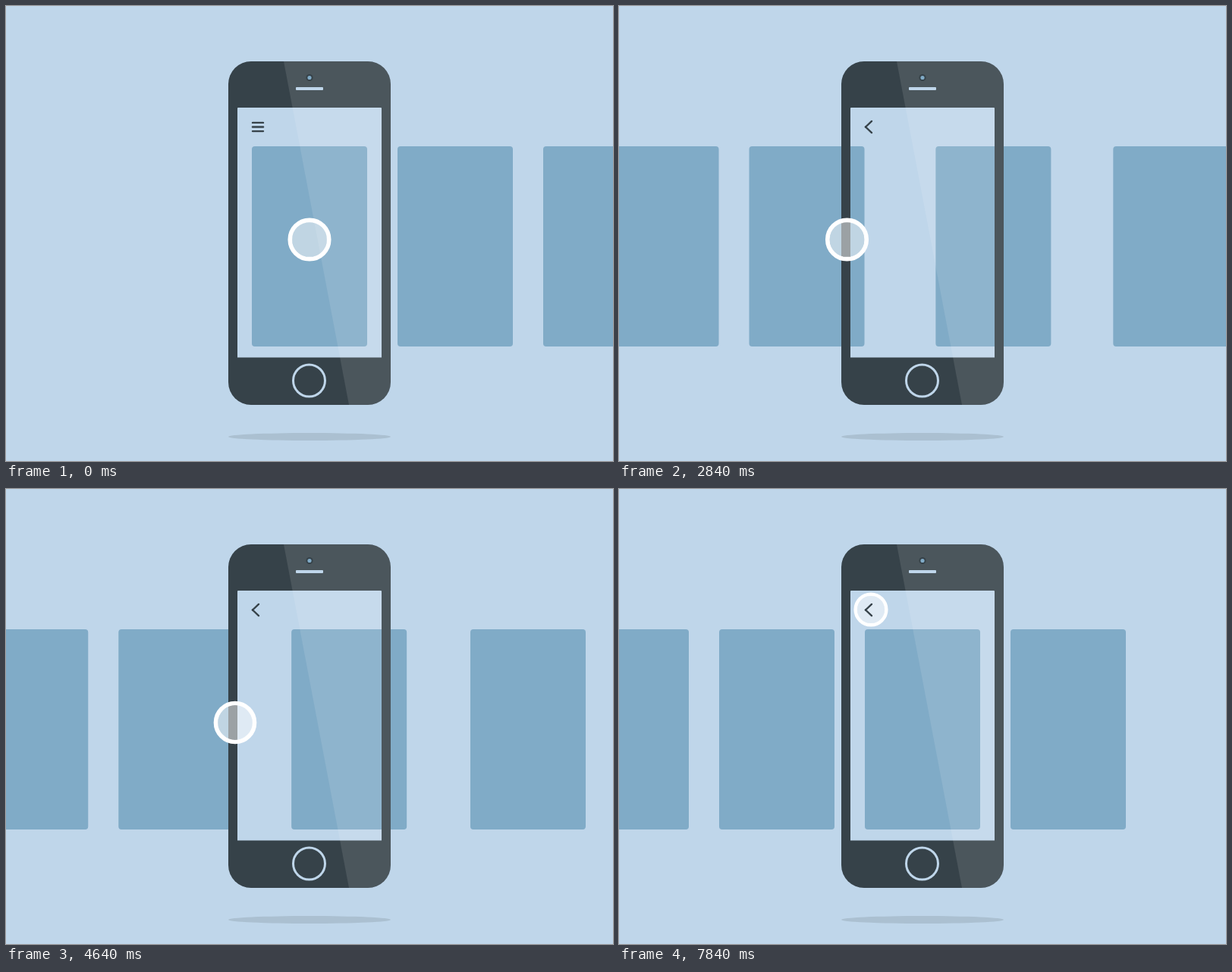
Animation of 800x600 px, one loop 8 s. Source, as an HTML page:

```html
<!DOCTYPE html>
<html lang="en">
<head>
<meta charset="utf-8">
<title>Card swipe</title>
<style>
  html, body { margin: 0; width: 100%; height: 100%; overflow: hidden; background: #bfd6ea; }
  svg { display: block; width: 100vw; height: 100vh; }
</style>
</head>
<body>
<svg viewBox="0 0 800 600">
  <defs>
    <clipPath id="body"><rect x="293" y="73" width="214" height="453" rx="30"/></clipPath>
  </defs>
  <rect width="800" height="600" fill="#bfd6ea"/>
  <ellipse cx="400" cy="568" rx="107" ry="5" fill="#abc0d1"/>
  <g id="cards" fill="#80abc7"></g>
  <g clip-path="url(#body)">
    <path fill="#364249" fill-rule="evenodd" d="M293 73H507V526H293Z M306 134H494Q495 134 495 135V463.5H305V135Q305 134 306 134Z"/>
    <path fill="#fff" fill-opacity=".105" d="M366 73H507V526H452Z"/>
  </g>
  <circle cx="400" cy="94.5" r="4.6" fill="#364249"/>
  <circle cx="400" cy="94.5" r="2.6" fill="#80abc7"/>
  <rect x="382" y="107" width="36" height="4" rx="1" fill="#bfd6ea"/>
  <circle cx="399.5" cy="494" r="21" fill="none" stroke="#bfd6ea" stroke-width="3"/>
  <g id="touch">
    <circle r="23" fill="#fff" fill-opacity=".5"/>
    <circle r="25.7" fill="none" stroke="#fff" stroke-width="5.7"/>
  </g>
  <g id="icon" stroke="#364249" stroke-width="2.4" stroke-linecap="round">
    <line/><line/><line/>
  </g>
</svg>
<script>
const LOOP = 8000, STEP = 40, PITCH = 192, COUNT = 6;

// middle of the snap, its length, lag of the first and further followers, end of the drag
const swipes = [
  { mid: 1329, len: 500, lag: 51, more: 22, end: 1386 },
  { mid: 2808, len: 500, lag: 31, more: 20, end: 2866 },
  { mid: 3698, len: 250, lag: 25, more: 14, end: 3777 },
  { mid: 4608, len: 250, lag: 21, more: 11, end: 4681 },
  { mid: 5371, len: 450, lag: 25, more: 18, end: 5440 }
];
const back = { mid: 6944, len: 400, lag: 25, more: 25 };

const clamp = p => Math.min(1, Math.max(0, p));
const power = n => p => p < .5 ? (2 * p) ** n / 2 : 1 - (2 - 2 * p) ** n / 2;
const cubic = power(3), quint = power(5);
const expo = p => p <= 0 ? 0 : p >= 1 ? 1
  : p < .5 ? 2 ** (20 * p - 10) / 2 : 1 - 2 ** (10 - 20 * p) / 2;
const tween = (t, from, to, ease = cubic) => ease(clamp((t - from) / (to - from)));
const mix = (a, b, p) => a + (b - a) * p;

function snap(t, s, rank) {
  const delay = rank > 0 ? s.lag + (rank - 1) * s.more : 0;
  const start = s.mid - s.len / 2 + delay;
  return tween(t, start, start + s.len, expo);
}

const $ = id => document.getElementById(id);
const set = (el, attrs) => { for (const k in attrs) el.setAttribute(k, attrs[k]); };

const cards = Array.from({ length: COUNT }, () => {
  const el = document.createElementNS("http://www.w3.org/2000/svg", "rect");
  set(el, { y: 185, width: 152, height: 264, rx: 4 });
  return $("cards").appendChild(el);
});
const bars = $("icon").children;

function drawCards(t) {
  cards.forEach((el, i) => {
    let slot = i + snap(t, back, COUNT - 1 - i);
    swipes.forEach((s, k) => slot -= snap(t, s, i - k));
    set(el, { x: (324 + slot * PITCH).toFixed(2) });
  });
}

function drawTouch(t) {
  let x = 400, y = 308, press = 0;
  swipes.forEach(({ end }, k) => {
    if (k) x += 100 * tween(t, end - 746, end - 520);
    x -= 100 * tween(t, end - 240, end);
    press += tween(t, end - 556, end - 270) - tween(t, end - 120, end - 20);
  });
  const travel = tween(t, 6130, 6410, quint);
  x += 32 * travel;
  y -= 149 * travel;
  press += tween(t, 6480, 6700) - tween(t, 6880, 7080) + tween(t, 7520, 7770);
  set($("touch"), { transform: `translate(${x} ${y}) scale(${1 - .21 * press})` });
}

function drawIcon(t) {
  const p = tween(t, 1080, 1340);
  [-1, 0, 1].forEach((side, i) => {
    const left = 159.5 + side * mix(5.6, 0, p);
    const right = 159.5 + side * mix(5.6, 7.6, p);
    set(bars[i], {
      x1: 325, y1: left,
      x2: side ? mix(339, 333, p) : mix(339, 325, p), y2: right
    });
  });
}

function frame(now) {
  const t = Math.floor(now % LOOP / STEP) * STEP;
  drawCards(t);
  drawTouch(t);
  drawIcon(t);
}

let begin = null;
function tick(now) {
  if (begin === null) begin = now;
  frame(now - begin);
  requestAnimationFrame(tick);
}
frame(0);
requestAnimationFrame(tick);
</script>
</body>
</html>
```
